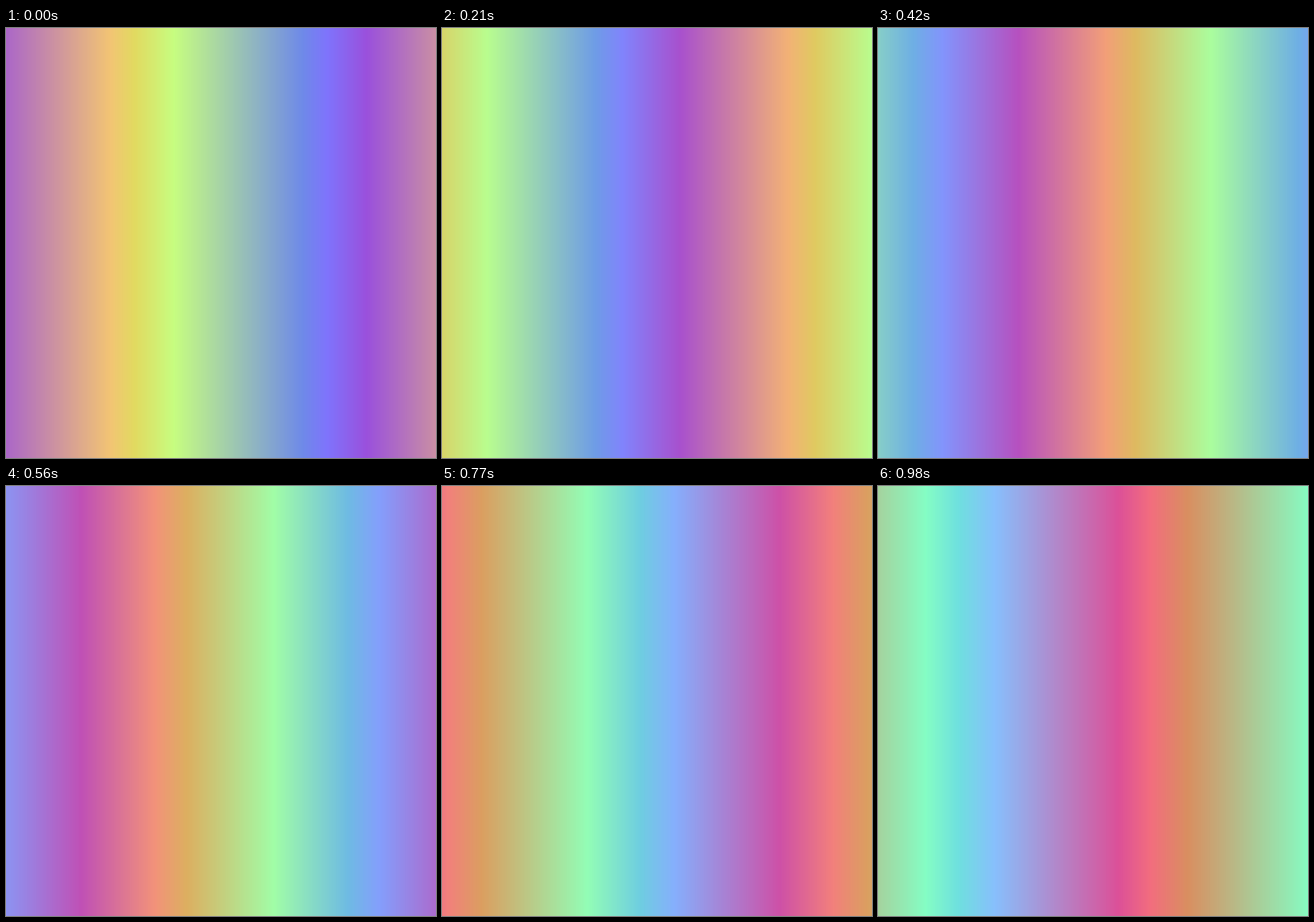
An HTML page with a canvas for the animation above (1.05 s loop, 480 by 480 pixels).

```html
<!DOCTYPE html>
<html lang="en">
<head>
<meta charset="utf-8">
<title>Rainbow drift</title>
<style>
  html, body { margin: 0; width: 100%; height: 100%; overflow: hidden; }
  canvas { display: block; width: 100vw; height: 100vh; }
</style>
</head>
<body>
<canvas id="stage" width="480" height="480"></canvas>
<script>
const SIZE = 480, WAVE = 430, STEP = 70, STEPS = 15, HOP = 28;
const ctx = document.getElementById('stage').getContext('2d');

// Every channel is a triangle wave sliding left at its own speed
const red = { crest: 116, speed: 44, low: 110, high: 242 };
const green = { crest: 187, speed: 36.3, low: 80, high: 253 };
const blue = { crest: 358, speed: 43, low: 96, high: 252 };

// 1 at a crest, 0 half a wave away
function triangle(distance) {
  const turn = distance / WAVE;
  return 1 - 2 * Math.abs(turn - Math.round(turn));
}

function level(wave, x, step) {
  // All waves hop ahead together once every eight steps
  const hops = Math.floor((step + 6) / 8) * HOP;
  const crest = wave.crest - wave.speed * step - hops;
  return Math.round(wave.low + (wave.high - wave.low) * triangle(x - crest));
}

function draw(step) {
  for (let x = 0; x < SIZE; x++) {
    const rgb = [red, green, blue].map(wave => level(wave, x, step));
    ctx.fillStyle = `rgb(${rgb})`;
    ctx.fillRect(x, 0, 1, SIZE);
  }
}

const start = performance.now();
let shown = 0;

function tick() {
  const step = Math.floor((performance.now() - start) / STEP) % STEPS;
  if (step !== shown) draw(shown = step);
  requestAnimationFrame(tick);
}

draw(0);
requestAnimationFrame(tick);
</script>
</body>
</html>
```
